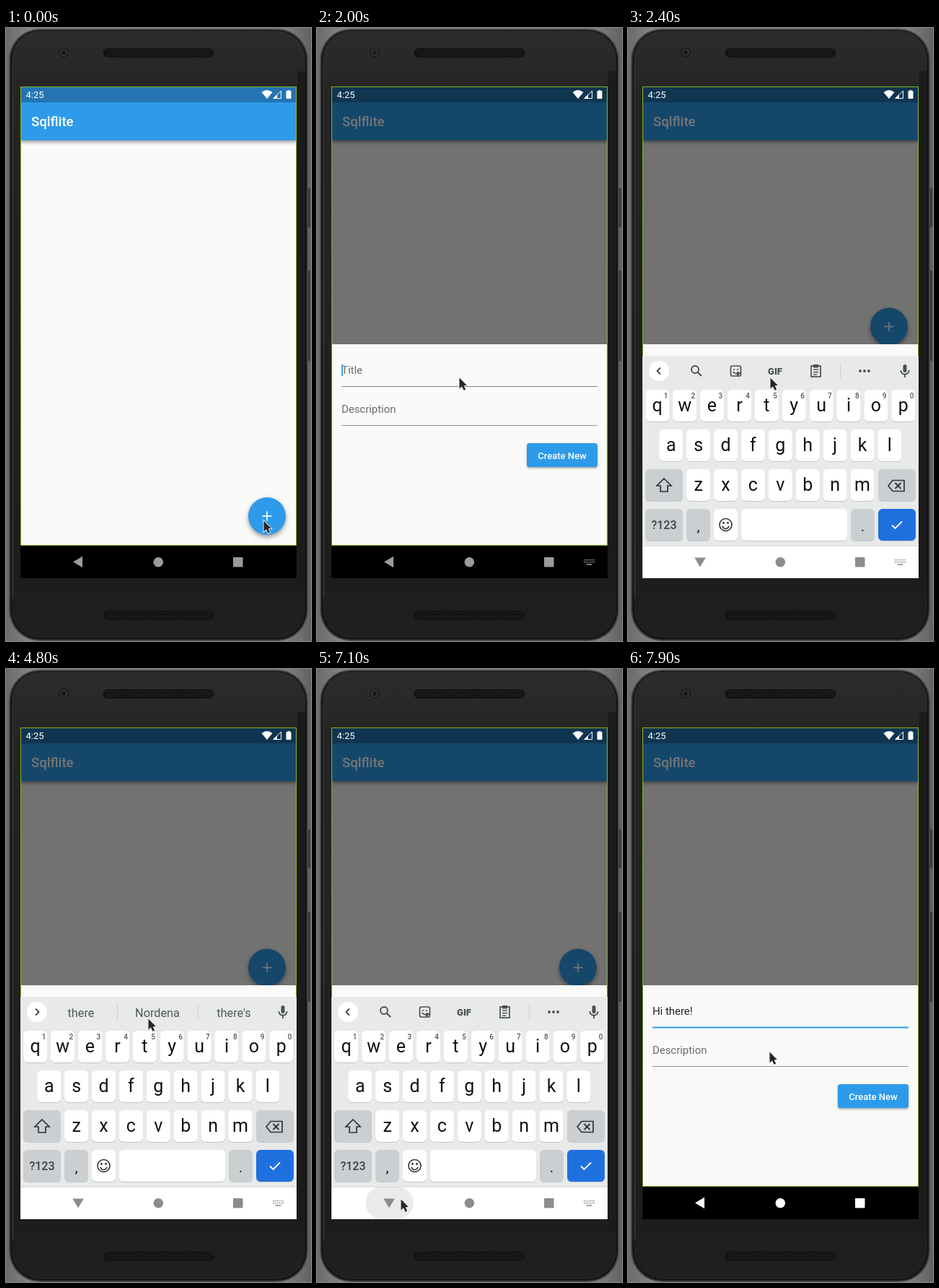
Animation, 423 px wide and 849 px high, one loop 8 s. Source, as an HTML page with a canvas:

```html
<!DOCTYPE html>
<html lang="en">
<head>
<meta charset="utf-8">
<title>Notes app</title>
<style>
html, body { margin: 0; width: 100%; height: 100%; overflow: hidden; background: #777; }
canvas { display: block; }
</style>
</head>
<body>
<canvas id="stage" width="423" height="849"></canvas>
<script>
const ctx = document.getElementById('stage').getContext('2d');
const LOOP = 8000, STEP = 100, KEYBOARD_HEIGHT = 308;
const BLUE = '#2e9bea', PAPER = '#fafaf8', INK = '#4b4f52', CHIP = '#cbcfd2';

// Pointer path: time, x, y
const POINTER = [
  [0, 357, 682], [600, 357, 682], [700, 330, 652], [800, 270, 585], [900, 215, 520],
  [1000, 196, 506], [1100, 194, 504], [1200, 194, 504], [1300, 194, 495], [1400, 197, 484],
  [6100, 197, 484], [6200, 184, 586], [6300, 150, 690], [6400, 105, 790], [6500, 75, 802],
  [6600, 128, 754], [6700, 128, 754], [6800, 116, 734], [7100, 116, 734], [7200, 132, 710],
  [7300, 157, 667], [7400, 174, 612], [7500, 187, 562], [7600, 192, 538], [7700, 193, 534],
  [7800, 193, 534], [7900, 196, 530]
];

// Suggestion strip by start time; no words means the toolbar
const STRIP = [
  [0, null], [3200, ['h', 'have', 'he']], [3400, ['hi', 'Hi', 'him']],
  [3800, ['I', 'the', "I'm"]], [4300, ['to', 'the', 'this']], [4500, ['the', 'The', 'they']],
  [4600, ['ther', 'there', 'thermal']], [4800, ['there', 'Nordena', "there's"]],
  [5300, null], [7200, ['', '', '']]
];

const clamp = v => Math.max(0, Math.min(1, v));
const span = (t, from, to) => clamp((t - from) / (to - from));

function rect(x, y, w, h, color) {
  ctx.fillStyle = color;
  ctx.fillRect(x, y, w, h);
}

function round(x, y, w, h, r, color) {
  ctx.beginPath();
  ctx.roundRect(x, y, w, h, r);
  ctx.fillStyle = color;
  ctx.fill();
}

function disc(x, y, r, color) {
  ctx.beginPath();
  ctx.arc(x, y, r, 0, Math.PI * 2);
  ctx.fillStyle = color;
  ctx.fill();
}

function ring(x, y, r) {
  ctx.beginPath();
  ctx.arc(x, y, r, 0, Math.PI * 2);
  ctx.stroke();
}

function trace(points, closed) {
  ctx.beginPath();
  points.forEach(([x, y], i) => i ? ctx.lineTo(x, y) : ctx.moveTo(x, y));
  if (closed) ctx.closePath();
}

function polygon(points, color) {
  trace(points, true);
  ctx.fillStyle = color;
  ctx.fill();
}

function line(points, color = INK, width = 1.8, closed = false) {
  trace(points, closed);
  pen(color, width);
  ctx.stroke();
}

function pen(color, width) {
  ctx.strokeStyle = color;
  ctx.lineWidth = width;
}

function text(str, x, y, size, color, weight = 400, align = 'left') {
  ctx.font = `${weight} ${size}px Roboto, sans-serif`;
  ctx.textAlign = align;
  ctx.fillStyle = color;
  ctx.fillText(str, x, y);
}

function shadowed(blur, dy, alpha, paint) {
  ctx.save();
  ctx.shadowColor = `rgba(0,0,0,${alpha})`;
  ctx.shadowBlur = blur;
  ctx.shadowOffsetY = dy;
  paint();
  ctx.restore();
}

function gradient(x0, y0, x1, y1, stops) {
  const g = ctx.createLinearGradient(x0, y0, x1, y1);
  stops.forEach(([at, color]) => g.addColorStop(at, color));
  return g;
}

function grille(y) {
  round(134.5, y, 154, 13, 6.5, '#111211');
  for (let row = 0; row < 4; row++)
    for (let x = 139 + row % 2 * 1.5; x < 285; x += 3)
      rect(x, y + 2 + row * 2.6, 1.2, 1.2, '#2d2e2d');
}

function drawPhone() {
  rect(0, 0, 423, 849, gradient(0, 0, 423, 0, [[0, '#6b6b6a'], [0.1, '#8a8a88'], [0.9, '#858583'], [1, '#626261']]));
  rect(418, 222, 4, 54, '#3b3c3b');
  rect(418, 336, 4, 125, '#3b3c3b');
  round(4, 1, 415, 848, 43, '#444544');
  round(6, 3, 411, 844, 41, '#111211');
  round(8, 4, 407, 841, 39, gradient(0, 0, 0, 849, [[0, '#2c2d2b'], [0.12, '#242523'], [0.9, '#1d1e1c'], [1, '#20211f']]));
  rect(8, 50, 3, 740, '#2b2c2b');
  rect(404, 60, 11, 720, '#1a1b1a');
  grille(28);
  grille(807);
  disc(80, 34, 7, '#1c1d1c');
  disc(80, 34, 5, '#343534');
  disc(80, 34, 3, '#161718');
  rect(20, 81, 383, 681, '#000');
}

function drawStatus() {
  text('4:25', 27.5, 97, 13, '#fff');
  ctx.beginPath();
  ctx.moveTo(362, 98);
  ctx.lineTo(354.5, 89);
  ctx.quadraticCurveTo(362, 83, 369.5, 89);
  ctx.closePath();
  ctx.fillStyle = '#fff';
  ctx.fill();
  polygon([[370, 98], [376, 92], [376, 98]], '#fff');
  line([[371, 97.5], [381.5, 97.5], [381.5, 87], [371, 97.5]], '#fff', 1);
  round(388.5, 87, 7, 11, 1, '#fff');
  rect(390.5, 86, 3, 2, '#fff');
}

function drawFab(y, pressed) {
  shadowed(pressed ? 10 : 6, pressed ? 5 : 3, 0.4, () => disc(362, y, 26, BLUE));
  if (pressed) disc(362, y, 26, 'rgba(255,255,255,.2)');
  rect(355.5, y - 0.8, 13, 1.7, '#fff');
  rect(361.2, y - 6.5, 1.7, 13, '#fff');
}

function drawSheet(top, t) {
  const typed = t >= 7000, focused = t >= 2100;
  ctx.save();
  ctx.translate(0, top - 438);
  rect(20, 438, 383, 290, PAPER);
  text(typed ? 'Hi there!' : 'Title', 34, 479, 14.9, typed ? '#202020' : '#6b6b6a');
  if (t >= 1900 && t < 7900) rect(typed ? 89.5 : 34, 466, 1.8, 16, BLUE);
  rect(34, focused ? 495.5 : 496, 355, focused ? 2 : 1, focused ? BLUE : '#848484');
  text('Description', 34, 533, 14.9, '#6b6b6a');
  rect(34, 550, 355, 1, '#929292');
  shadowed(3, 1.5, 0.35, () => round(291, 575, 98, 33, 3.5, BLUE));
  text('Create New', 340, 596.5, 13, '#fff', 500, 'center');
  ctx.restore();
}

function drawApp(t, up) {
  const open = 1 - (1 - span(t, 550, 850)) ** 3;
  ctx.save();
  ctx.beginPath();
  ctx.rect(20, 81, 383, 636);
  ctx.clip();
  rect(20, 81, 383, 636, PAPER);
  shadowed(5, 2, 0.4, () => rect(20, 81, 383, 74.5, BLUE));
  rect(20, 81, 383, 22, '#2474b2');
  text('Sqlflite', 35, 136, 18.64, '#fff', 500);
  const raised = t >= 2200 && t < 7200;
  drawFab(raised ? 413.5 : 676, t >= 500 && t < 800);
  rect(20, 81, 383, 636, `rgba(0,0,0,${0.54 * open})`);
  if (open > 0) drawSheet(717 - 279 * open, t);
  ctx.restore();
  drawStatus();
  pen('#84b822', 1);
  ctx.strokeRect(20.5, 81.5, 382, 635);
}

function drawMic() {
  round(381.5, 466, 5, 11, 2.5, INK);
  pen(INK, 1.7);
  ctx.beginPath();
  ctx.arc(384, 474, 5.7, 0, Math.PI);
  ctx.stroke();
  line([[384, 479.5], [384, 484]]);
}

function drawToolbar() {
  pen(INK, 1.9);
  ring(93, 473, 5);
  line([[96.5, 476.5], [102, 482]], INK, 2.2);
  pen(INK, 1.7);
  ctx.beginPath();
  ctx.roundRect(142.5, 468, 14, 14, 2.5);
  ctx.stroke();
  disc(147, 473, 1.1, INK);
  disc(152, 473, 1.1, INK);
  ctx.beginPath();
  ctx.arc(149.5, 475, 3.6, 0.2, Math.PI - 0.2);
  ctx.stroke();
  polygon([[151, 483], [157, 477], [151, 477]], INK);
  text('GIF', 204, 479.5, 13, INK, 900, 'center');
  pen(INK, 1.7);
  ctx.strokeRect(254, 468, 13, 15);
  rect(257, 466, 7, 4.5, INK);
  for (const y of [473, 476.5, 480]) rect(257, y - 0.6, y > 479 ? 5 : 7, 1.4, INK);
  rect(294, 465, 1, 21, '#cdd0d2');
  for (const x of [322, 328, 334]) disc(x, 475, 1.9, INK);
}

function drawStrip(t) {
  const words = STRIP.filter(([at]) => at <= t).pop()[1];
  disc(43, 475, 14, '#fff');
  const dir = words ? 1 : -1;
  line([[43 - 2 * dir, 470.5], [43 + 2.5 * dir, 475], [43 - 2 * dir, 479.5]], '#444', 1.8);
  if (!words) drawToolbar();
  else if (words[0]) {
    words.forEach((word, i) => text(word, 104 + i * 106, 481.5, 16.3, '#50565a', 400, 'center'));
    rect(154, 464, 1, 22, '#cdd0d2');
    rect(266, 464, 1, 22, '#cdd0d2');
  }
  if (t >= 7200) rect(368, 454, 34, 41, '#dcdfe0');
  drawMic();
}

function key(x, y, w = 33, color = '#fff') {
  round(x, y + 1, w, 44, 6, '#c3c6c8');
  round(x, y, w, 44, 6, color);
}

function drawKeys(caps) {
  const rows = [['qwertyuiop', 24.2, 501], ['asdfghjkl', 43.2, 556], ['zxcvbnm', 81.1, 611]];
  for (const [letters, left, y] of rows)
    [...letters].forEach((letter, i) => {
      const x = left + i * 37.9;
      key(x, y);
      text(caps ? letter.toUpperCase() : letter, x + 16.5, y + 29.5, 25, '#111', 400, 'center');
      if (y === 501) text((i + 1) % 10, x + 28.3, 512.5, 10, '#555', 500, 'center');
    });

  key(24, 611, 52, CHIP);
  const shift = [[50, 624], [60, 634], [55, 634], [55, 642], [45, 642], [45, 634], [40, 634]];
  if (caps) polygon(shift, '#333');
  line(shift, '#333', 1.7, true);

  key(347, 611, 52, CHIP);
  line([[361, 634], [367, 626.5], [383, 626.5], [383, 641.5], [367, 641.5]], '#333', 1.7, true);
  line([[370.5, 630], [378.5, 638]], '#333');
  line([[378.5, 630], [370.5, 638]], '#333');

  key(24, 666, 52, CHIP);
  text('?123', 50, 694, 16, '#3c4043', 500, 'center');
  key(81, 666, 33, CHIP);
  text(',', 97.5, 697, 21, '#222', 400, 'center');
  key(119, 666);
  pen('#333', 1.6);
  ring(135.5, 688, 8.5);
  disc(132.5, 685.5, 1.4, '#333');
  disc(138.5, 685.5, 1.4, '#333');
  ctx.beginPath();
  ctx.arc(135.5, 689, 4.5, 0.15, Math.PI - 0.15);
  ctx.stroke();
  key(157, 666, 147);
  key(309, 666, 33, CHIP);
  text('.', 325.5, 697, 21, '#222', 400, 'center');
  key(347, 666, 52, '#1f70df');
  line([[366, 688.5], [370.5, 693], [380, 683.5]], '#fff');
}

function drawKeyboard(t, offset) {
  ctx.save();
  ctx.beginPath();
  ctx.rect(20, 438, 383, 324);
  ctx.clip();
  ctx.translate(0, offset);
  rect(20, 454, 383, 308, '#e8eaea');
  drawStrip(t);
  drawKeys(t === 5300);
  rect(20, 717, 383, 45, '#fff');
  rect(20, 717, 383, 1, '#dedfdf');
  ctx.restore();
}

function drawNav(t, up) {
  const color = t >= 7200 || (up > 0 && up < 0.9) ? '#fff' : up > 0 ? '#8c8c8c' : '#9b9b98';
  if (t >= 7000) {
    const grow = span(t, 6900, 7200);
    const fade = 0.17 * (1 - span(t, 7300, 7800));
    round(100.5 - 49.5 * grow, 717, 99 * grow, 45, 22, `rgba(128,128,128,${fade})`);
  }
  ctx.save();
  ctx.translate(100, 739.5);
  ctx.rotate(-Math.PI / 2 * up);
  polygon([[-7, 0], [6, -7.8], [6, 7.8]], color);
  ctx.restore();
  disc(211.3, 739.8, 6.8, color);
  round(315, 733, 13.5, 13.5, 1, color);
  if (t >= 2000 && t < 7200) {
    for (let row = 0; row < 2; row++)
      for (let i = 0; i < 6; i++) rect(370 + i * 2.7, 736 + row * 3, 1.5, 1.5, color);
    rect(373.5, 742.3, 8, 1.5, color);
  }
}

function drawPointer(t) {
  const next = POINTER.findIndex(([at]) => at > t);
  const [t1, x1, y1] = POINTER[next < 0 ? POINTER.length - 1 : next];
  const [t0, x0, y0] = POINTER[next < 0 ? POINTER.length - 1 : next - 1];
  const p = t1 > t0 ? (t - t0) / (t1 - t0) : 0;
  ctx.save();
  ctx.translate(x0 + (x1 - x0) * p + 0.5, y0 + (y1 - y0) * p + 0.5);
  const arrow = [[0, 0], [0, 15], [3.5, 11.8], [6, 17.3], [8.6, 16.2], [6.2, 10.8], [10.3, 10.6]];
  line(arrow, '#f2f2f2', 1.8, true);
  polygon(arrow, '#262626');
  ctx.restore();
}

function keyboardOffset(t) {
  if (t < 7100) return KEYBOARD_HEIGHT * (1 - span(t, 2050, 2400)) ** 3;
  return KEYBOARD_HEIGHT * span(t, 7100, 7322) ** 2;
}

function draw(t) {
  const offset = keyboardOffset(t);
  const up = 1 - offset / KEYBOARD_HEIGHT;
  drawPhone();
  drawApp(t, up);
  if (up > 0) drawKeyboard(t, offset);
  drawNav(t, up);
  drawPointer(t);
}

const start = performance.now();
let shown = -1;

function tick() {
  const elapsed = Math.max(0, performance.now() - start) % LOOP;
  const t = Math.floor(elapsed / STEP) * STEP;
  if (t !== shown) draw(shown = t);
  requestAnimationFrame(tick);
}

document.fonts.ready.then(() => { shown = -1; });
tick();
</script>
</body>
</html>
```
